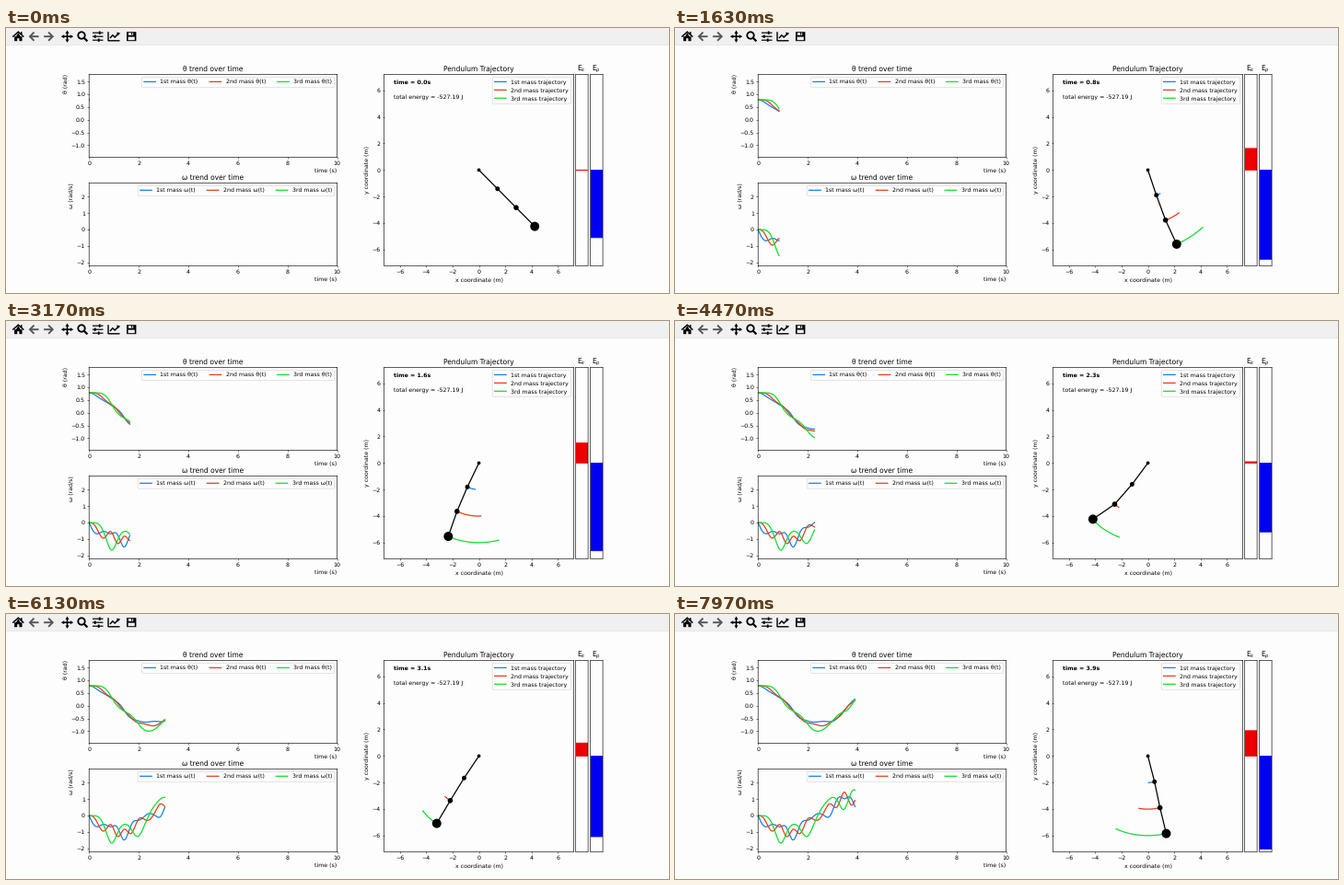
A matplotlib script for the animation above (8 s loop, 720 by 288 pixels).

```python
import numpy as np
import matplotlib.pyplot as plt
from matplotlib.animation import FuncAnimation
from matplotlib.patches import Circle, Rectangle, RegularPolygon

W, H, DPI = 720, 288, 45
FRAMES = 240
PAPER, BAR_GRAY = "#fdfdfe", "#f0f0f0"
COLORS = ["#1480e8", "#e63e16", "#12de2a"]
NAMES = ["1st", "2nd", "3rd"]
TOP, BOTTOM, PANEL = 50.4, 258.3, 90

plt.rcParams.update({
    "font.family": "DejaVu Sans",
    "text.hinting": "none",
    "path.snap": False,
    "axes.facecolor": PAPER,
    "axes.linewidth": 1.0,
})

# Triple pendulum, integrated with RK4
G, L = 9.81, 2.0
MASS = np.array([2.0, 3.0, 10.0])
BELOW = MASS[::-1].cumsum()[::-1]
COUPLE = BELOW[np.maximum.outer(np.arange(3), np.arange(3))]
DT, T_END = 0.0025, 4.0
TRAILS = np.array([15, 25, 40]) / 60


def slope(state):
    th, om = state
    diff = th[:, None] - th[None, :]
    force = -(COUPLE * L * np.sin(diff)) @ om**2 - BELOW * G * np.sin(th)
    return np.array([om, np.linalg.solve(COUPLE * L * np.cos(diff), force)])


def simulate():
    state = np.array([[np.pi / 4] * 3, [0.0] * 3])
    out = [state]
    for _ in range(round(T_END / DT)):
        k1 = slope(state)
        k2 = slope(state + DT / 2 * k1)
        k3 = slope(state + DT / 2 * k2)
        k4 = slope(state + DT * k3)
        state = state + DT / 6 * (k1 + 2 * k2 + 2 * k3 + k4)
        out.append(state)
    return np.array(out)


path = simulate()
theta, omega = path[:, 0], path[:, 1]
xs = np.cumsum(L * np.sin(theta), axis=1)
ys = np.cumsum(-L * np.cos(theta), axis=1)
potential = G * ys @ MASS
total = potential[0]
limit = G * L * BELOW.sum()


def clock(i):
    """Simulated seconds; the pace drops a little as the curves grow."""
    return 0.008 + 0.0177 * i - 5.85e-6 * i**2


fig = plt.figure(figsize=(W / DPI, H / DPI), dpi=DPI, facecolor=PAPER)


def add_axes(x0, y0, x1, y1):
    """Axes from a box in pixels, y pointing down."""
    return fig.add_axes([x0 / W, 1 - y1 / H, (x1 - x0) / W, (y1 - y0) / H])


def draw_toolbar():
    ax = add_axes(0, 0, W, 19)
    ax.set(xlim=(0, W), ylim=(19, 0))
    ax.axis("off")
    mid = 9.2

    def box(x, y, w, h, color="black"):
        ax.add_patch(Rectangle((x, y), w, h, fc=color, lw=0))

    def line(x, y, width=1.6, color="black"):
        ax.plot(x, y, color=color, lw=width * 72 / DPI,
                solid_capstyle="butt", solid_joinstyle="miter")

    def triangle(x, y, r, angle):
        ax.add_patch(RegularPolygon((x, y), 3, radius=r, fc="black", lw=0,
                                    orientation=angle))

    def home(x):
        line([x - 6, x, x + 6], [mid + 0.4, mid - 5, mid + 0.4], 1.5)
        triangle(x, mid - 0.4, 3.6, np.pi)
        box(x - 4.2, mid, 3.1, 5)
        box(x + 1.1, mid, 3.1, 5)
        box(x - 2, mid, 4, 2)
        box(x + 2.6, mid - 5, 1.6, 3.4)

    def arrow(x, way):
        line([x, x - 4.6 * way, x], [mid - 4.6, mid, mid + 4.6], 1.9, "#555")
        line([x - 4.2 * way, x + 5 * way], [mid, mid], 1.9, "#555")

    def pan(x):
        line([x - 4, x + 4], [mid, mid])
        line([x, x], [mid - 4, mid + 4])
        for a in np.arange(4) * np.pi / 2:
            triangle(x - 4.4 * np.sin(a), mid + 4.4 * np.cos(a), 2.3, a)

    def zoom(x):
        ax.add_patch(Circle((x - 1.2, mid - 1.2), 3.7, fill=False, lw=2.9))
        line([x + 1.4, x + 5.2], [mid + 1.4, mid + 5.2], 2.2)

    def sliders(x):
        for row, shift in zip((-1, 0, 1), (2, -3, 1)):
            y = mid + 4 * row
            line([x - 5.8, x + 5.8], [y, y], 1.2)
            box(x + shift - 0.9, y - 1.7, 1.8, 3.4)

    def chart(x):
        line([x - 6, x - 6, x + 6.5], [mid - 5, mid + 4.6, mid + 4.6], 1.4)
        line(x + np.array([-4, -1.2, 1.2, 5]),
             mid + np.array([1.8, -1.4, 0.8, -3]), 1.5)
        triangle(x + 4.9, mid - 3, 2.4, 3 * np.pi / 4)

    def save(x):
        box(x - 5.2, mid - 5, 10.4, 10)
        box(x - 3.2, mid - 4, 5.2, 2.6, BAR_GRAY)
        box(x - 0.2, mid - 4, 1.2, 2.2)
        box(x - 3.6, mid + 0.4, 7.2, 3.6, BAR_GRAY)

    box(0, 0, W, 18, BAR_GRAY)
    box(0, 18, W, 1, "#e8e8e8")
    home(13.3)
    arrow(30.5, 1)
    arrow(46.1, -1)
    pan(66.5)
    zoom(83.2)
    sliders(99.7)
    chart(117)
    save(136.2)


def trend(top, sign, unit, ylim, step):
    ax = add_axes(90.2, top, 359.7, top + PANEL)
    ax.set(xlim=(0, 10), ylim=ylim)
    ax.yaxis.set_major_locator(plt.MultipleLocator(step))
    ax.set_title(f"{sign} trend over time")
    ax.set_xlabel("time (s)", loc="right")
    ax.set_ylabel(f"{sign} ({unit})", loc="top")
    lines = [ax.plot([], [], color=c, lw=2, label=f"{n} mass {sign}(t)")[0]
             for c, n in zip(COLORS, NAMES)]
    ax.legend(loc="upper right", ncol=3)
    return lines


def energy_bar(x0, name, color):
    ax = add_axes(x0, TOP, x0 + 13.4, BOTTOM)
    ax.set(xlim=(0, 1), ylim=(-limit, limit), xticks=[], yticks=[])
    ax.set_title(f"E$_{name}$", y=1)
    bar = Rectangle((0, 0), 1, 0, fc=color, ec=color, lw=1.2)
    ax.add_patch(bar)
    return bar


def draw_stage():
    ax = add_axes(410.6, TOP, 616.5, BOTTOM)
    ticks = range(-6, 7, 2)
    ax.set(xlim=(-7.2, 7.2), ylim=(-7.2, 7.2), xticks=ticks, yticks=ticks)
    ax.set_title("Pendulum Trajectory")
    ax.set_xlabel("x coordinate (m)", labelpad=5)
    ax.set_ylabel("y coordinate (m)")
    return ax


def add_bob(size):
    """Black disc at the pivot, its diameter given in points."""
    scale = (BOTTOM - TOP) / 14.4
    return stage.add_patch(Circle((0, 0), size / 2 * DPI / 72 / scale,
                                  fc="black", lw=0, zorder=3))


draw_toolbar()
th_lines = trend(TOP, "θ", "rad", (-1.47, 1.78), 0.5)
om_lines = trend(BOTTOM - PANEL, "ω", "rad/s", (-2.2, 2.85), 1)

stage = draw_stage()
trails = [stage.plot([], [], color=c, lw=2, label=f"{n} mass trajectory")[0]
          for c, n in zip(COLORS, NAMES)]
rod, = stage.plot([], [], color="black", lw=2)
add_bob(6)
bobs = [add_bob(6 + m) for m in MASS]
stage.legend(loc="upper right")
time_text = stage.text(0.05, 0.95, "", weight="bold",
                       transform=stage.transAxes)
stage.text(0.05, 0.873, f"total energy = {total:.2f} J",
           transform=stage.transAxes)

kinetic_bar = energy_bar(618.7, "k", "#ee0000")
potential_bar = energy_bar(634.7, "p", "#0000f2")


def update(i):
    t = clock(i)
    now = round(t / DT)
    times = np.arange(now + 1) * DT
    for k in range(3):
        th_lines[k].set_data(times, theta[:now + 1, k])
        om_lines[k].set_data(times, omega[:now + 1, k])
        start = now - round(TRAILS[k] / DT)
        span = slice(start, now + 1) if start >= 0 else slice(0, 0)
        trails[k].set_data(xs[span, k], ys[span, k])
        bobs[k].center = xs[now, k], ys[now, k]
    rod.set_data(np.r_[0, xs[now]], np.r_[0, ys[now]])
    time_text.set_text(f"time = {t:.1f}s")
    kinetic_bar.set_height(total - potential[now])
    potential_bar.set_height(potential[now])
    return [*th_lines, *om_lines, *trails, rod, *bobs, time_text,
            kinetic_bar, potential_bar]


anim = FuncAnimation(fig, update, frames=FRAMES, interval=8000 / FRAMES,
                     init_func=lambda: update(0), repeat=True, repeat_delay=0)
plt.show()
```
